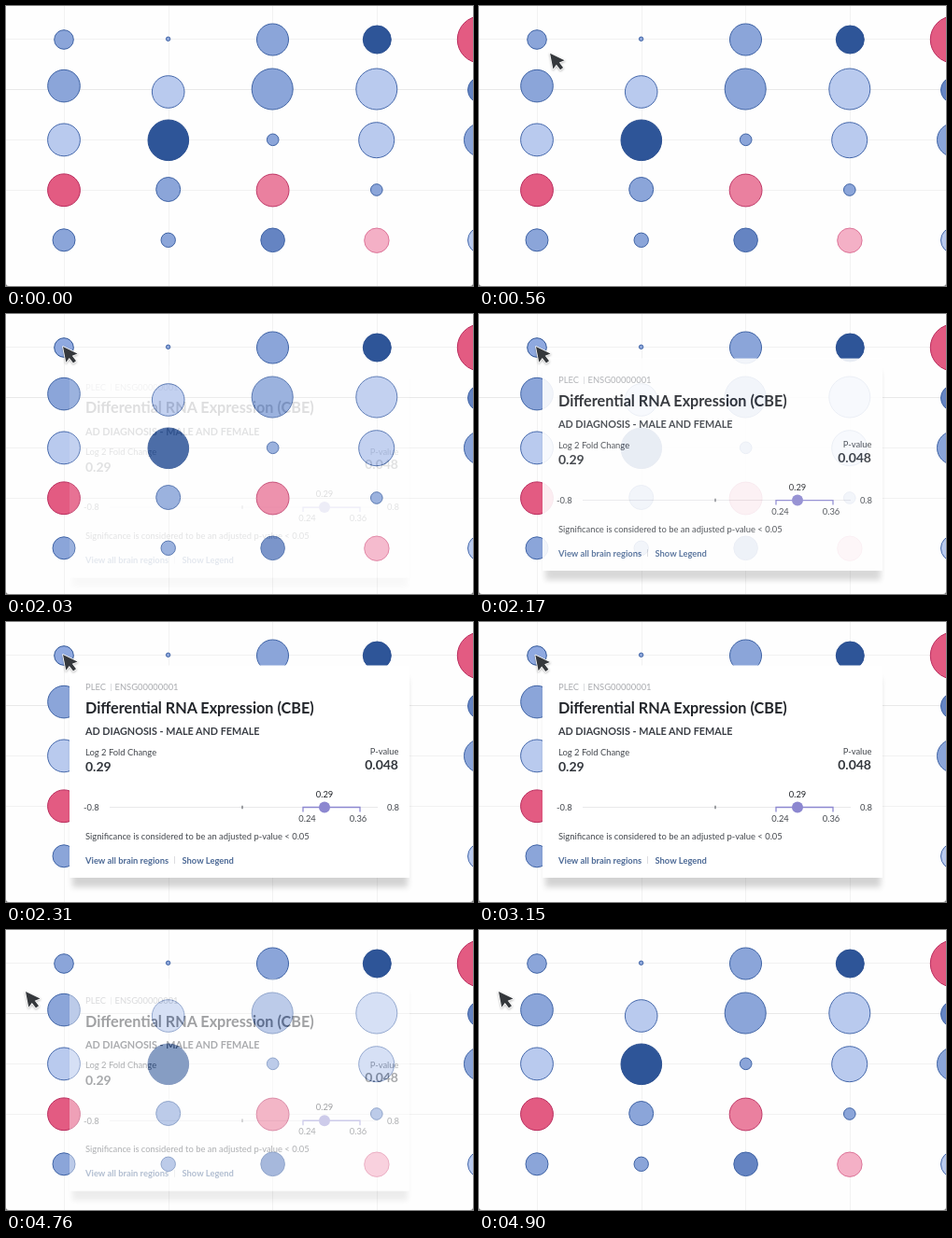
Write an HTML page that moves like this. It is 500 px wide and 300 px high and loops after 5950 ms.

```html
<!DOCTYPE html>
<html lang="en">
<head>
<meta charset="utf-8">
<title>Bubble chart tooltip</title>
<style>
  html, body { margin: 0; width: 100%; height: 100%; overflow: hidden; background: #777; }
  svg { display: block; width: 100vw; height: 100vh; background: #fefefe; border-radius: 0 0 3px 3px; }
  text { font: 9.4px Lato, sans-serif; fill: #43474d; }
  .bold { font-weight: 700; }
  .title { font-size: 16.2px; fill: #22252a; }
  .subtitle { font-size: 10.8px; fill: #3b3f46; }
  .value { font-size: 14px; fill: #33373d; }
  .muted { fill: #a9abaf; }
  .link { fill: #4d6a96; }
  .end { text-anchor: end; }
  .mid { text-anchor: middle; }
  .shadow { fill: #000; opacity: .17; filter: blur(3px); }
  .divider { stroke: #dcdde0; }
  .range { fill: none; stroke: #8c87d0; stroke-width: 1.3; }
</style>
</head>
<body>
<svg viewBox="0 0 500 300">
  <path d="M0 35.5H500M0 143.5H500M0 197.5H500M62.5 0V300M174.5 0V300M285.5 0V300M397.5 0V300" stroke="#f2f2f2"/>
  <path d="M0 89.5H500" stroke="#e9e9e9"/>
  <g id="bubbles"></g>

  <g id="tooltip" opacity="0">
    <rect class="shadow" x="71" y="60" width="359" height="224"/>
    <rect x="68" y="46.5" width="364" height="227.5" fill="#fff"/>
    <text class="muted" x="85" y="73">PLEC</text>
    <path class="divider" d="M112.5 66V74M180.5 251V259"/>
    <text class="muted" x="116.5" y="73">ENSG00000001</text>
    <text class="bold title" x="85" y="97.8">Differential RNA Expression (CBE)</text>
    <text class="bold subtitle" x="85" y="121">AD DIAGNOSIS - MALE AND FEMALE</text>
    <text x="85" y="142.5">Log 2 Fold Change</text>
    <text class="bold value" x="85" y="160">0.29</text>
    <text class="end" x="420.5" y="142.3">P-value</text>
    <text class="bold value end" x="420" y="157.5">0.048</text>

    <path d="M111 198.5H398" stroke="#e8e8ea"/>
    <path d="M253 196.7V200.3" stroke="#62656b" stroke-width="1.2"/>
    <path class="range" d="M318 203.5V198.5H379V203.5"/>
    <circle cx="341" cy="198.5" r="6" fill="#8c87d0"/>
    <text x="83" y="201.8">-0.8</text>
    <text class="end" x="421" y="201.8">0.8</text>
    <text class="mid" x="341" y="187.7" style="fill:#22252a">0.29</text>
    <text class="mid" x="322.5" y="213.5">0.24</text>
    <text class="mid" x="377" y="213.5">0.36</text>

    <text x="85" y="232.5">Significance is considered to be an adjusted p-value &lt; 0.05</text>
    <text class="bold link" x="85" y="258.5">View all brain regions</text>
    <text class="bold link" x="188.5" y="258.5">Show Legend</text>
  </g>

  <g id="cursor" visibility="hidden">
    <path d="M0 0L15.5 7.5L9.8 9.8L14 15.3L11 17.6L6.8 12L3.3 16.8Z" fill="#35383c"
      stroke="#fff" stroke-width="1.6" stroke-linejoin="round" paint-order="stroke"
      style="filter:drop-shadow(0 1px 1px #0004)"/>
  </g>
</svg>
<script>
  const LOOP = 5950, TICK = 70;
  const paints = {
    light: ['#b9caee', '#4568ab'],
    mid: ['#8ba5d9', '#3f63a5'],
    strong: ['#6584c2', '#3f63a5'],
    dark: ['#2e5598', '#2a4f91'],
    rose: ['#e35b82', '#b92c5d'],
    blush: ['#ea809f', '#bf3766'],
    pale: ['#f4b0c6', '#dd7599']
  };
  const bubbles = [
    [62, 36, 10.3, 'mid'], [173.6, 35.3, 2.2, 'mid'], [285.5, 36, 17, 'mid'], [397.3, 36, 15, 'dark'], [508.5, 36, 25.2, 'rose'],
    [62, 85.6, 17.3, 'mid'], [173.7, 92, 17.3, 'light'], [285.2, 89, 22, 'mid'], [396.8, 89, 22, 'light'], [508.5, 90, 14, 'strong'],
    [62, 143.4, 17.4, 'light'], [173.8, 143.8, 21.8, 'dark'], [285.7, 143.3, 6.3, 'mid'], [396.7, 143.7, 19, 'light'], [508.5, 143.5, 18, 'mid'],
    [62, 197.3, 17.4, 'rose'], [173.7, 196.5, 13, 'mid'], [285.6, 197.5, 17.4, 'blush'], [396.8, 197, 6.3, 'mid'],
    [62, 250.8, 12, 'mid'], [173.7, 250.8, 7.7, 'mid'], [285.6, 250.8, 12.8, 'strong'], [396.9, 251.2, 13.2, 'pale'], [508.5, 251, 14, 'light']
  ];
  const byId = id => document.getElementById(id);
  const layer = byId('bubbles'), tooltip = byId('tooltip'), cursor = byId('cursor');

  for (const [cx, cy, r, paint] of bubbles) {
    const [fill, stroke] = paints[paint];
    const dot = document.createElementNS(layer.namespaceURI, 'circle');
    Object.entries({ cx, cy, r, fill, stroke }).forEach(([key, value]) => dot.setAttribute(key, value));
    layer.append(dot);
  }
  const target = layer.firstChild;

  const progress = (t, start, length) => Math.min(1, Math.max(0, (t - start) / length));
  const smooth = p => p * p * (3 - 2 * p);
  const mix = (a, b, p) => a + (b - a) * p;

  function cursorAt(t) {
    const enter = smooth(progress(t, 50, 610));
    const leave = smooth(progress(t, 3110, 530));
    return [
      mix(mix(271, 61, enter), 21, leave),
      mix(mix(253, 35, enter), 66, leave)
    ];
  }

  function draw(now) {
    const t = Math.floor(now % LOOP / TICK) * TICK;
    const shown = progress(t, 2003, 187) - progress(t, 4610, 260);
    const hovered = t >= 1470 && t < 3290;
    tooltip.setAttribute('opacity', shown);
    tooltip.setAttribute('transform', `translate(0 ${10 * (1 - shown)})`);
    cursor.setAttribute('visibility', t < TICK ? 'hidden' : 'visible');
    cursor.setAttribute('transform', `translate(${cursorAt(t)})`);
    target.setAttribute('fill', hovered ? '#8fa9e0' : paints.mid[0]);
    target.setAttribute('stroke', hovered ? '#2f5597' : paints.mid[1]);
  }

  let start;
  function frame(now) {
    start ??= now;
    draw(now - start);
    requestAnimationFrame(frame);
  }
  requestAnimationFrame(frame);
</script>
</body>
</html>
```
